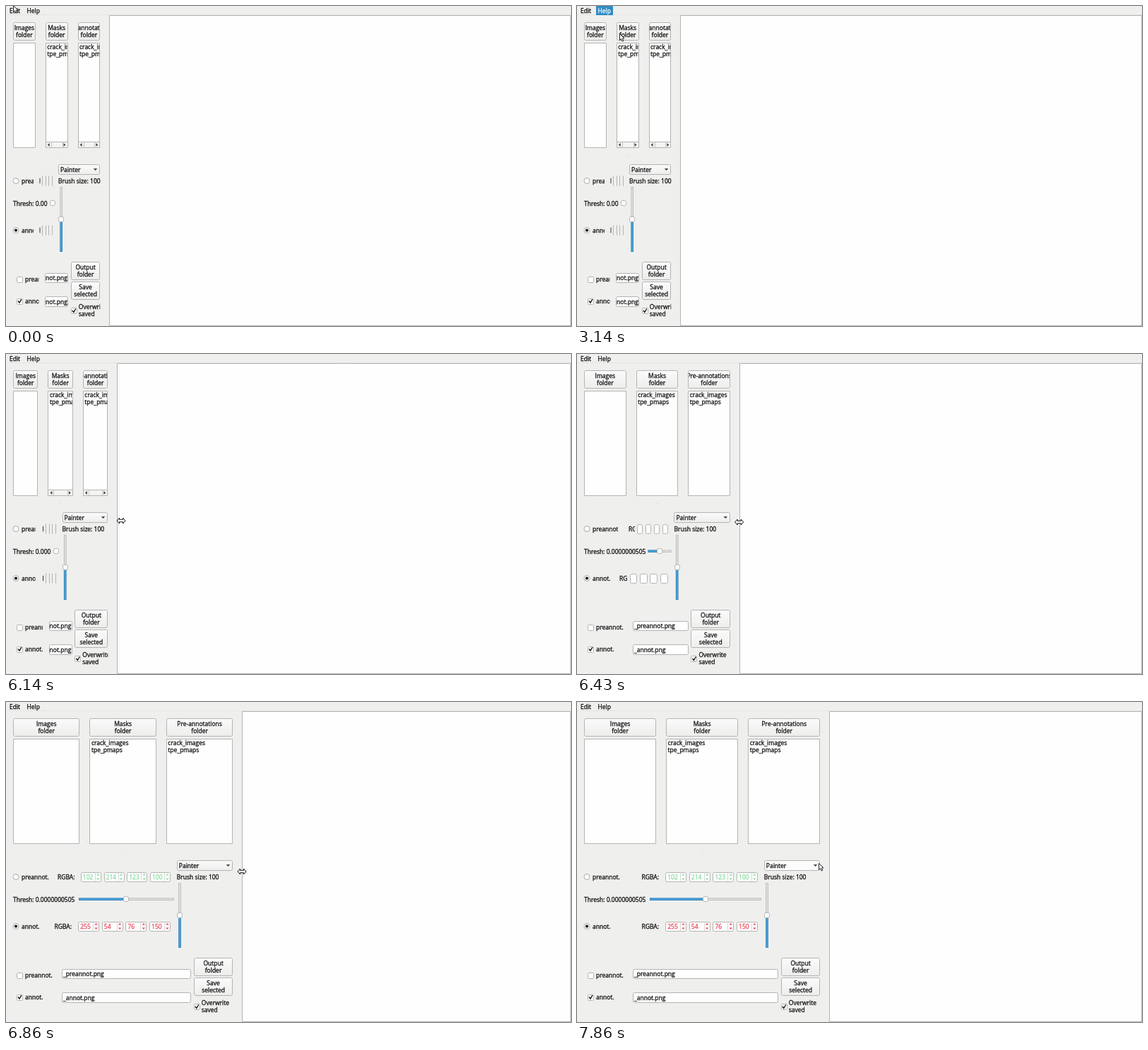
An HTML page with a canvas for the animation above (8000 ms loop, 800 px wide and 453 px high).

```html
<!DOCTYPE html>
<html lang="en">
<head>
<meta charset="utf-8">
<style>
html, body { margin: 0; width: 100%; height: 100%; overflow: hidden; background: #efefee; }
canvas { display: block; }
</style>
</head>
<body>
<canvas id="stage" width="800" height="453"></canvas>
<script>
const g = document.getElementById('stage').getContext('2d');
const LOOP = 8000, FPS = 7;
const INK = '#111', EDGE = '#b4b4b3', WHITE = '#fefefe';
const FONT = '8.5px "Open Sans", "Noto Sans", sans-serif';
const { min, max, round } = Math;

// way points: step (a seventh of a second), then place
const PATH = [[0, 10, -1], [6, 13, 4], [10, 20, 43], [13, 38, 6], [15, 39, 1], [19, 41, 1],
  [22, 60, 39], [27, 225, 139], [31, 180, 252], [33, 152, 239], [35, 141, 234], [42, 146, 235]];
const DRAG = [[42, 146], [43, 157], [46, 266], [48, 334], [50, 352], [51, 357]];
const HELP = 13, OFF = 15, ON = 18, LEAVE = 28, RESIZE = 40, DROP = 55;

function along(keys, n) {
  const i = keys.findIndex(k => k[0] > n);
  if (i < 1) return keys.at(i).slice(1);
  const a = keys[i - 1], b = keys[i], u = (n - a[0]) / (b[0] - a[0]);
  return a.slice(1).map((v, j) => v + (b[j + 1] - v) * u);
}

function clipped(x0, x1, draw) {
  g.save();
  g.beginPath();
  g.rect(x0, 0, max(0, x1 - x0), 453);
  g.clip();
  draw();
  g.restore();
}
// y is the middle of the line; a hairline outline thickens the letters
function text(s, x, y, align = 'left', color = INK) {
  g.font = FONT;
  g.textAlign = align;
  g.fillStyle = g.strokeStyle = color;
  g.lineWidth = .3;
  g.fillText(s, x, y + 3);
  g.strokeText(s, x, y + 3);
}
function rect(x, y, w, h, color) {
  g.fillStyle = color;
  g.fillRect(x, y, w, h);
}
function paint(fill, edge) {
  g.fillStyle = fill;
  g.fill();
  if (!edge) return;
  g.strokeStyle = edge;
  g.lineWidth = 1;
  g.stroke();
}
function box(x0, y0, x1, y1, fill = WHITE, r = 2, edge = EDGE) {
  const x = round(x0) + .5, y = round(y0) + .5;
  g.beginPath();
  g.roundRect(x, y, round(x1) - .5 - x, round(y1) - .5 - y, r);
  paint(fill, edge);
}
function poly(pts, fill, edge) {
  g.beginPath();
  pts.forEach(([x, y]) => g.lineTo(x, y));
  g.closePath();
  paint(fill, edge);
}
function disc(x, y, r, fill, edge) {
  g.beginPath();
  g.arc(x, y, r, 0, 7);
  paint(fill, edge);
}
function face(y0, y1) {
  const f = g.createLinearGradient(0, y0, 0, y1);
  f.addColorStop(0, '#fbfbfb');
  f.addColorStop(1, '#ededec');
  return f;
}
function groove(x, y, w, h, blue) {
  rect(x, y, w, h, blue ? '#3485bc' : '#b9b9b8');
  rect(x + .8, y + .8, w - 1.6, h - 1.6, blue ? '#47a1da' : '#dededd');
}
function knob(x, y) {
  box(x - 4, y - 4, x + 4, y + 4, '#fcfcfc');
}
function button(x0, x1, y, top, bottom) {
  box(x0, y, x1, y + 26, face(y, y + 26));
  clipped(x0 + 1, x1 - 1, () => {
    text(top, (x0 + x1) / 2, y + 8, 'center');
    text(bottom, (x0 + x1) / 2, y + 18, 'center');
  });
}
function check(x, y, on) {
  box(x, y - 4, x + 9, y + 5, WHITE, 1);
  if (!on) return;
  g.beginPath();
  g.moveTo(x + 2, y);
  g.lineTo(x + 4, y + 2.5);
  g.lineTo(x + 7, y - 2.5);
  g.strokeStyle = INK;
  g.lineWidth = 1.4;
  g.stroke();
}

function list(x0, x1, filled) {
  box(x0, 52, x1, 201, WHITE, 0);
  if (!filled) return;
  clipped(x0 + 1, x1 - 1, () => {
    text('crack_images', x0 + 2.5, 58);
    text('tpe_pmaps', x0 + 2.5, 68);
  });
  if (x1 - x0 > 58) return;
  box(x0, 192, x1, 201, '#f4f4f3', 0);
  for (const [x, d] of [[x0, 1], [x1, -1]]) {
    rect(round(x + d * 8), 193, 1, 7, '#c8c8c7');
    poly([[x + d * 3, 196.5], [x + d * 6, 194], [x + d * 6, 199]], '#444');
  }
}

// four spin boxes squeezed between a label and the right end
function spins(y, least, end, values, color) {
  const label = max(least, end - 164.6);
  const w = max(.7, min(31.2, (end - label - 14.5) / 5));
  const start = end - 4 * w - 10.8;
  clipped(label, start - 3, () => text('RGBA:', label, y));
  values.forEach((v, i) => {
    const x = start + i * (w + 3.6), r = x + w;
    if (w < 3) return rect(round(x), y - 7, 1, 14, EDGE);
    box(x, y - 7, r, y + 7);
    if (w < 11) return;
    clipped(x + 1, r - 9, () => text(v, x + 3, y, 'left', color));
    rect(round(r - 9), y - 6, 1, 12, '#d6d6d5');
    for (const d of [-1, 1])
      poly([[r - 7, y + d * 2], [r - 2.4, y + d * 2], [r - 4.7, y + d * 4.4]], color);
  });
}

function edit(x0, x1, y, value) {
  box(x0, y - 7.5, x1, y + 7);
  g.font = FONT;
  const fits = g.measureText(value).width < x1 - x0 - 5;
  clipped(x0 + 1, x1 - 1, () => text(value, fits ? x0 + 2.5 : x1 - 1.5, y, fits ? 'left' : 'right'));
}

function panel(s, hover) {
  const R = s - 12.7, k = (s - 146) / 2;
  const w = (R - 38) / 3;
  ['Images', 'Masks', 'Pre-annotations'].forEach((name, i) => {
    const x = 10 + i * (w + 14);
    button(x, x + w, 23, name, 'folder');
    list(x, x + w, i > 0);
  });
  rect((R + 10) / 2 - 2, 211, 4, 1, '#e3e3e2');

  const C = R - min(79.5, 59.3 + k);
  box(C, 223.6, R, 239, hover ? '#fcfcfc' : face(224, 239));
  text('Painter', C + 3, 231.5);
  poly([[R - 9.5, 230], [R - 4, 230], [R - 6.75, 233]], '#444');
  clipped(C, R + 1, () => text('Brush size: 100', C, 247.5));
  groove(C + 2.4, 256, 3.6, 92);
  groove(C + 2.4, 302, 3.6, 46, true);
  knob(C + 4.2, 302);

  ['preannot.', 'annot.'].forEach((name, i) => {
    const y = 247.5 + i * 70;
    disc(14, y, 4, WHITE, '#a9a9a8');
    if (i) disc(14, y, 2.1, INK);
    clipped(20, min(63, 39 + k * .45), () => text(name, 22, y));
  });
  const least = 47 + k * .8;
  spins(247.5, min(73, least), C - 8.7, ['102', '214', '123', '100'], '#8edba4');
  spins(317.5, min(60, least), C - 8.7, ['255', '54', '76', '150'], '#ee4b5c');

  const t0 = min(103, 62 + k * .92), t1 = C - 4, mid = (t0 + t1) / 2;
  clipped(9, t0 - 3.5, () => text('Thresh: 0.0000000505', 10, 279.5));
  if (t1 - t0 > 10) {
    groove(t0, 277.4, t1 - t0, 3.6);
    groove(t0, 277.4, mid - t0, 3.6, true);
  }
  knob(mid, 279);

  const B = R - min(55.5, 41.5 + k);
  button(B, R, 362, 'Output', 'folder');
  button(B, R, 390, 'Save', 'selected');
  check(B, 431, true);
  clipped(B, R, () => {
    text('Overwrite', B + 11, 426);
    text('saved', B + 11, 436);
  });
  const e0 = min(78.5, 55 + k);
  ['preannot', 'annot'].forEach((name, i) => {
    const y = 387 + i * 30.5;
    check(15, y, i);
    clipped(25, e0 - 8.7, () => text(name + '.', 27, y));
    edit(e0, B - 3.5, 385 + i * 33.5, '_' + name + '.png');
  });

  box(s, 13, 800, 453, WHITE, 0);
}

function menu(name, x, x0, x1, on) {
  if (on) rect(x0, 0, x1 - x0, 13, '#308cc6');
  text(name, x, 6.5, 'left', on ? '#fff' : INK);
}

function pointer(x, y, resize) {
  g.save();
  g.translate(x, y);
  if (resize) {
    poly([[-6, 0], [-2.5, -4], [-2.5, -1.7], [2.5, -1.7], [2.5, -4], [6, 0],
      [2.5, 4], [2.5, 1.7], [-2.5, 1.7], [-2.5, 4]], '#fff', '#111');
  } else {
    poly([[.5, .5], [.5, 9.5], [2.6, 7.6], [4.2, 11], [5.8, 10.2], [4.3, 7], [7, 6.8]], '#fff', '#222');
  }
  g.restore();
}

function frame(now) {
  // the screen refreshes seven times a second
  const n = Math.floor((now % LOOP + 5) * FPS / 1000);
  const [split] = along(DRAG, n);
  let [x, y] = along(PATH, n);
  if (n > 42) [x, y] = [max(163, split), min(240, 236 + (n - 43))];
  if (n >= DROP) [x, y] = [342, 228];

  rect(0, 0, 800, 453, '#efefee');
  rect(0, 12, 800, 1, '#e4e4e3');
  menu('Edit', 5, 2, 24, n >= 2 && n < HELP);
  menu('Help', 29.5, 27, 51, n >= HELP && n < LEAVE && !(n >= OFF && n < ON));
  panel(split, n >= DROP);
  pointer(x, y, n >= RESIZE && n < DROP);
  requestAnimationFrame(frame);
}
requestAnimationFrame(frame);
</script>
</body>
</html>
```
